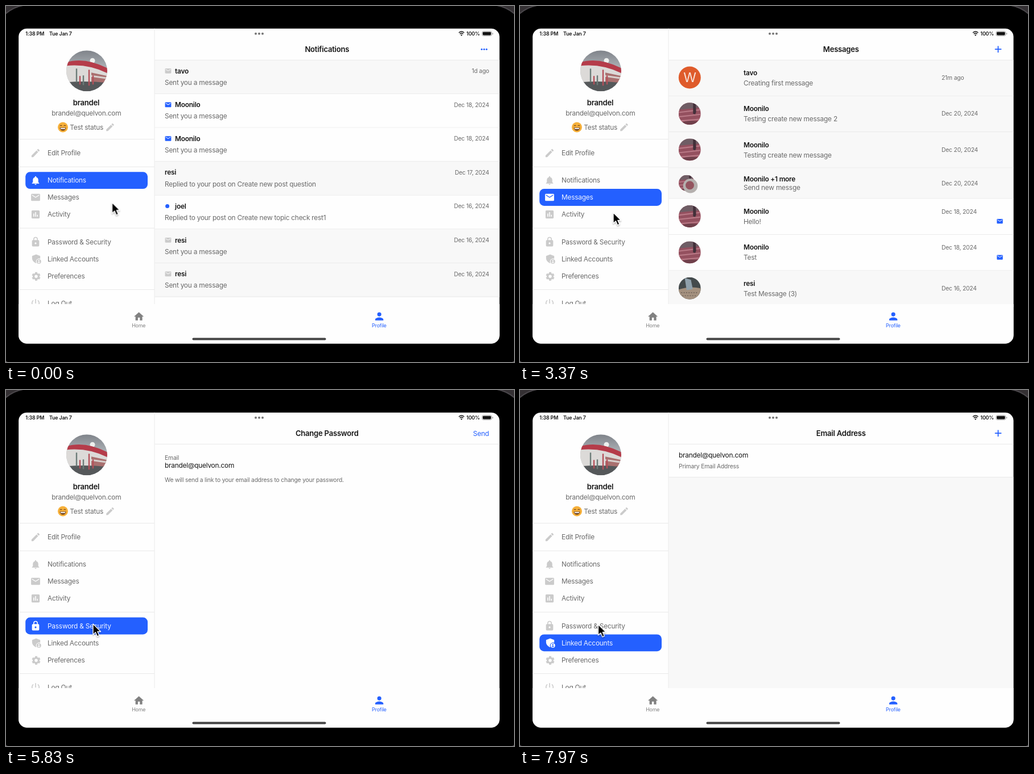
An HTML page for the animation above (8000 ms loop, 893 by 627 pixels).

```html
<!DOCTYPE html>
<html lang="en">
<head>
<meta charset="utf-8">
<title>Tablet profile</title>
<style>
  html, body { margin: 0; width: 100%; height: 100%; overflow: hidden; background: #000; }
  svg { display: block; width: 893px; height: 627px; }
  text { font-family: Inter, Roboto, sans-serif; letter-spacing: -.019em; white-space: pre; }
  .bold { font-weight: 600; }
  .mid { text-anchor: middle; }
  .end { text-anchor: end; }
  .screen { visibility: hidden; }
  #spinner { transform-origin: 564px 302.5px; animation: spin 1s steps(8) infinite; }
  #cursor { animation: move 8s infinite ease-in-out; }
  @keyframes spin { to { transform: rotate(360deg); } }
</style>
</head>
<body>
<svg id="stage" viewBox="0 0 893 627" xmlns="http://www.w3.org/2000/svg"></svg>
<script>
const LOOP = 8000;
const BLUE = '#2460ff', INK = '#161616', GRAY = '#6a6a6a', ICON = '#cbcbcb', LINE = '#e9e9e9', PALE = '#f8f8f8', PAGE = '#fefefe';
const USER = 'brandel', EMAIL = 'brandel@quelvon.com';
const SIZES = { title: 13.1, body: 11.88, small: 10.35, tiny: 8.9 };

const PATHS = {
  edit: 'M3 17.25V21h3.75L17.81 9.94l-3.75-3.75zM20.71 7.04a1 1 0 0 0 0-1.41l-2.34-2.34a1 1 0 0 0-1.41 0l-1.83 1.83 3.75 3.75z',
  bell: 'M12 22a2 2 0 0 0 2-2h-4a2 2 0 0 0 2 2zm6-6v-5c0-3.07-1.63-5.64-4.5-6.32V4a1.5 1.5 0 0 0-3 0v.68C7.64 5.36 6 7.92 6 11v5l-2 2v1h16v-1z',
  mail: 'M20 4H4a2 2 0 0 0-2 2v12a2 2 0 0 0 2 2h16a2 2 0 0 0 2-2V6a2 2 0 0 0-2-2zm0 4l-8 5-8-5V6l8 5 8-5z',
  chart: 'M19 3H5a2 2 0 0 0-2 2v14a2 2 0 0 0 2 2h14a2 2 0 0 0 2-2V5a2 2 0 0 0-2-2zM9 17H7v-7h2zm4 0h-2V7h2zm4 0h-2v-4h2z',
  lock: 'M18 8h-1V6A5 5 0 0 0 7 6v2H6a2 2 0 0 0-2 2v10a2 2 0 0 0 2 2h12a2 2 0 0 0 2-2V10a2 2 0 0 0-2-2zm-6 9a2 2 0 1 1 0-4 2 2 0 0 1 0 4zm3.1-9H8.9V6a3.1 3.1 0 0 1 6.2 0z',
  shield: 'M12 2l9 3.5v6.2a7 7 0 0 0-8.6 9.8l-.4.2c-5-1.6-9-6-9-11V5.5zM18 13a5 5 0 1 0 0 10 5 5 0 0 0 0-10zm0 1.7a1.6 1.6 0 1 1 0 3.2 1.6 1.6 0 0 1 0-3.2zm0 6.8a3.6 3.6 0 0 1-2.7-1.5c.6-1.4 4.8-1.4 5.4 0a3.6 3.6 0 0 1-2.7 1.5z',
  power: 'M13 3h-2v10h2zM17.8 5.2l-1.4 1.4a7 7 0 1 1-8.8 0L6.2 5.2a9 9 0 1 0 11.6 0z',
  home: 'M10 20v-6h4v6h5v-8h3L12 3 2 12h3v8z',
  person: 'M12 12a4 4 0 1 0 0-8 4 4 0 0 0 0 8zm0 2c-2.67 0-8 1.34-8 4v2h16v-2c0-2.66-5.33-4-8-4z'
};

// y is the visual middle of the line
const text = (x, y, str, size = 'body', fill = GRAY, cls = '') =>
  `<text x="${x}" y="${y + SIZES[size] * .36}" font-size="${SIZES[size]}" fill="${fill}" class="${cls}">${str}</text>`;
const rect = (x, y, w, h, fill, rx = 0, extra = '') =>
  `<rect x="${x}" y="${y}" width="${w}" height="${h}" rx="${rx}" fill="${fill}" ${extra}/>`;
const circle = (x, y, r, fill, extra = '') => `<circle cx="${x}" cy="${y}" r="${r}" fill="${fill}" ${extra}/>`;
const hline = (x, y, w) => rect(x, y - .5, w, 1, LINE);
const picture = (id, x, y, r) => `<use href="#${id}" transform="translate(${x} ${y}) scale(${r / 36})"/>`;

function icon(name, x, y, size, fill = ICON) {
  const at = `transform="translate(${x} ${y}) scale(${size / 24})"`;
  if (name !== 'gear') return `<g ${at}><path transform="translate(-12 -12)" fill="${fill}" d="${PATHS[name]}"/></g>`;
  const teeth = [0, 60, 120].map(a =>
    `<path d="M0-9.5V-6M0 6V9.5" stroke-width="5" transform="rotate(${a})"/>`).join('');
  return `<g ${at} fill="none" stroke="${fill}"><circle r="5.5" stroke-width="4.2"/>${teeth}</g>`;
}

const MENU = [
  ['edit', 'Edit Profile', 259], ['bell', 'Notifications', 307.2], ['mail', 'Messages', 337],
  ['chart', 'Activity', 367], ['lock', 'Password &amp; Security', 415.5],
  ['shield', 'Linked Accounts', 445.3], ['gear', 'Preferences', 475.3], ['power', 'Log Out', 523.3]
];
const menuItem = ([name, label, y], textFill = GRAY, iconFill = ICON) =>
  icon(name, name === 'gear' || name === 'shield' ? 53 : 52, name === 'gear' ? y + 1 : y, 19, iconFill) +
  text(73, y, label, 'body', textFill);
const activeItem = i => rect(34.2, MENU[i][2] - 14.9, 214.8, 29.8, BLUE, 8) + menuItem(MENU[i], '#eef2ff', '#fff');

const header = title => text(564.3, 76.3, title, 'title', INK, 'bold mid');
const plus = `<path d="M840.5 70.5v11.5M834.8 76.2h11.5" stroke="${BLUE}" stroke-width="1.8"/>`;

function notifications() {
  const sent = 'Sent you a message', reply = 'Replied to your post on Create new ';
  const rows = [
    ['tavo', sent, '1d ago', 'read'], ['Moonilo', sent, 'Dec 18, 2024', 'new'],
    ['Moonilo', sent, 'Dec 18, 2024', 'new'], ['resi', reply + 'post question', 'Dec 17, 2024', 'plain'],
    ['joel', reply + 'topic check rest1', 'Dec 16, 2024', 'dot'],
    ['resi', sent, 'Dec 16, 2024', 'read'], ['resi', sent, 'Dec 16, 2024', 'read']
  ];
  const dots = [836.2, 840.5, 844.8].map(x => circle(x, 76.2, 1.5, BLUE)).join('');
  return header('Notifications') + dots + rows.map(([name, body, date, kind], i) => {
    const top = 95.3 + 59.6 * i, y = top + 19;
    const unread = kind === 'new' || kind === 'dot';
    const mark = kind === 'dot' ? circle(283.6, y - .3, 3.5, BLUE)
      : kind === 'plain' ? '' : icon('mail', 285, y, 13, unread ? BLUE : ICON);
    return rect(261.5, top, 606, 59.6, unread ? PAGE : PALE) + hline(261.5, top + 59.2, 606) + mark +
      text(kind === 'plain' ? 279 : 297, y, name, 'body', INK, 'bold') +
      text(279, y + 20.2, body) + text(849.3, y, date, 'small', GRAY, 'end');
  }).join('');
}

function loading() {
  const spokes = Array.from({ length: 8 }, (_, i) =>
    `<path d="M564 306V309.5" stroke="${BLUE}" stroke-width="1.9" stroke-linecap="round"
      opacity="${1 - i * .11}" transform="rotate(${-45 * i} 564 302.5)"/>`).join('');
  return header('Messages') + plus + `<g id="spinner">${spokes}</g>` + text(563.8, 317.5, 'Loading...', 'body', INK, 'mid');
}

function messages() {
  const rows = [
    ['tavo', 'Creating first message', '21m ago', 'letter'],
    ['Moonilo', 'Testing create new message 2', 'Dec 20, 2024', 'field'],
    ['Moonilo', 'Testing create new message', 'Dec 20, 2024', 'field'],
    ['Moonilo +1 more', 'Send new messge', 'Dec 20, 2024', 'pair'],
    ['Moonilo', 'Hello!', 'Dec 18, 2024', 'field', true],
    ['Moonilo', 'Test', 'Dec 18, 2024', 'field', true],
    ['resi', 'Test Message (3)', 'Dec 16, 2024', 'seeds']
  ];
  let top = 95.3;
  return header('Messages') + plus + rows.map(([name, body, date, face, unread]) => {
    const pair = face === 'pair', h = pair ? 54 : 63.4, mid = top + (pair ? 27.3 : 31);
    const avatar = face === 'letter'
      ? circle(298.3, mid - .3, 19.5, '#df5b2b') +
        `<text x="298.3" y="${mid + 7.9}" font-size="23" fill="#f8e3da" class="mid">W</text>`
      : pair ? picture('field', 293, mid - 1, 14) + circle(299.5, mid + 4, 12.8, '#b5b0ae') + circle(298.5, mid + 3, 7.5, '#94545f')
      : picture(face, 298.3, mid, 19.5);
    const out = rect(261.5, top, 606, h, unread ? PAGE : PALE) + hline(261.5, top + h - .4, 606) + avatar +
      text(393, mid - (pair ? 7.7 : 8.7), name, 'body', INK, 'bold') +
      text(393, mid + (pair ? 7 : 9.2), body) +
      text(741, mid - (unread ? 8.7 : pair ? .5 : 0), date, 'small') +
      (unread ? icon('mail', 843.5, mid + 8.7, 12.5, BLUE) : '');
    top += h;
    return out;
  }).join('');
}

function activity() {
  const posts = [
    ['Creating new post landscape', 'a few seconds ago', 'hello my new post'],
    ['Creating new post tablet', '22m ago', 'hello my first post'],
    ['Post image', 'Dec 23, 2024', '']
  ];
  return header('Activity') + rect(261.5, 95.5, 606, 430, PALE) + posts.map(([title, when, body], i) => {
    const y = 104 + 169.2 * i;
    return rect(305.7, y, 517, 160, '#fff', 4, 'filter="url(#soft)"') +
      text(324, y + 26.3, title, 'title', INK, 'bold') + picture('venue', 338.7, y + 60.7, 15) +
      text(359.5, y + 53.7, 'Brandel', 'body', INK) + text(359.5, y + 69, when, 'small') +
      rect(324, y + 88, 82, 21.5, '#fff', 1, `stroke="${LINE}"`) + circle(333.5, y + 98.7, 2.4, '#222') +
      text(339.3, y + 98.7, 'Verbora UAT', 'small') + text(324, y + 129.5, body, 'body', INK);
  }).join('');
}

const password = () => header('Change Password') + text(849, 76.3, 'Send', 'body', BLUE, 'end') +
  text(279, 119.3, 'Email', 'small') + text(279, 133, EMAIL, 'body', INK) +
  text(279, 158.5, 'We will send a link to your email address to change your password.', 'small');

const linked = () => header('Email Address') + plus + rect(261.5, 153.5, 606, 372, PALE) + hline(261.5, 153.5, 606) +
  text(279, 114.7, EMAIL, 'body', INK) + text(279, 134.2, 'Primary Email Address', 'small');

// start time, active menu entry, content
const SCREENS = [
  [0, 1, notifications()], [1300, 2, loading()], [2650, 2, messages()],
  [3800, 3, activity()], [5500, 4, password()], [7600, 5, linked()]
];

// time, x, y of the pointer tip
const POINTER = [
  [0, 186.5, 346.3], [250, 186.5, 346.3], [730, 185, 331], [1200, 174, 334], [2030, 171.5, 333.5], [2650, 171.5, 333.5],
  [3370, 164, 364], [4500, 163, 365], [5170, 156, 401], [5450, 153, 412], [5900, 153, 412],
  [6630, 155.5, 340], [7450, 146, 446], [7650, 145, 446], [7970, 137.5, 413], [8000, 137.5, 413]
];

const sidebar = () => picture('venue', 142, 114.3, 36) +
  text(141, 170.3, USER, 'title', INK, 'bold mid') + text(141.3, 188.5, EMAIL, 'body', GRAY, 'mid') +
  circle(100, 213.5, 9, '#f6b03a') +
  `<path d="M94.5 214h11a5.5 5.5 0 0 1-11 0z" fill="#6b3d18"/><path d="M95.5 214.8h9l-.8 1.9h-7.4z" fill="#fff"/>
   <path d="M95 211.5q1.7-3 3.4 0m3.2 0q1.7-3 3.4 0" fill="none" stroke="#6b3d18" stroke-width="1.2"/>` +
  text(112.3, 213.5, 'Test status') + icon('edit', 183, 213.5, 18) +
  [234.7, 283.2, 391.2, 499.5].map(y => hline(22, y, 239)).join('') +
  MENU.map(item => menuItem(item)).join('') + rect(260.5, 39, 1, 487, LINE) + hline(261.5, 95.3, 606);

const statusBar = () => text(34.3, 48.5, '1:38 PM', 'tiny', INK, 'bold') + text(76, 48.5, 'Tue Jan 7', 'tiny', INK, 'bold') +
  [439, 445, 451].map(x => circle(x, 48.7, 2, '#777')).join('') +
  `<path d="M796 47q4.7-3.9 9.4 0M797.7 49.2q3-2.3 6 0" fill="none" stroke="#111" stroke-width="1.5"/>
   <path d="M799 50.9q1.7-1.2 3.4 0l-1.7 1.9z" fill="#111"/>` +
  text(833, 48.5, '100%', 'tiny', INK, 'bold end') +
  rect(836.8, 44.6, 17, 8, 'none', 2.4, 'stroke="#999" stroke-width=".8"') + rect(838, 45.8, 14.6, 5.6, '#111', 1.4) +
  rect(855, 47.2, 1.2, 3, '#999', .6);

const tabBar = () => rect(22, 525, 846, 70, PAGE) +
  icon('home', 233.6, 547, 20.5, '#818181') + text(233.3, 562.7, 'Home', 'tiny', '#818181', 'mid') +
  icon('person', 656.2, 546.7, 21.5, BLUE) + text(656, 562.7, 'Profile', 'tiny', BLUE, 'mid') +
  rect(327.5, 584.5, 235, 4, '#444', 2);

const DEFS = `<defs>
  <clipPath id="glass"><rect x="22.2" y="39.7" width="845.3" height="554.8" rx="14.5"/></clipPath>
  <clipPath id="round"><circle r="36"/></clipPath>
  <filter id="soft" x="-5%" y="-5%" width="110%" height="115%">
    <feDropShadow dx="0" dy="1" stdDeviation="1.5" flood-opacity=".13"/></filter>
  <filter id="drop" x="-40%" y="-40%" width="200%" height="200%">
    <feDropShadow dx="0" dy="1.5" stdDeviation="1.2" flood-opacity=".35"/></filter>
  <linearGradient id="sky" x2="0" y2="1"><stop stop-color="#7f838a"/><stop offset=".5" stop-color="#b4b9bd"/></linearGradient>
  <g id="venue" clip-path="url(#round)">
    <path d="M-36-36h72v72h-72z" fill="url(#sky)"/>
    <circle cx="10" cy="-18" r="4.5" fill="#eef0ee"/>
    <path d="M-36-11L-6-14 36 2v20h-72z" fill="#dcdad8"/>
    <path d="M-36-15Q-4-25 36-5V4Q2-13-36-9z" fill="#b53c4a"/>
    <path d="M8 3l28 6v13H8z" fill="#a9706f"/>
    <path d="M8 9l28 4" stroke="#d8d0cd" stroke-width="3"/>
    <path d="M-36 20Q0 17 36 21v15h-72z" fill="#55585a"/>
    <path d="M-12 9v15M4-2v28M11 8v16" stroke="#b5505a" stroke-width="2.4"/>
    <path d="M-18-4v24M-6 8v17" stroke="#6c7c78" stroke-width="2.4"/>
  </g>
  <g id="field" clip-path="url(#round)">
    <path d="M-36-36h72v72h-72z" fill="#94505f"/>
    <path d="M-36-36h72v16l-72 7z" fill="#6f5d65"/>
    <path d="M-36-4L36-13M-36 10L36 2M-36 24L36 18" stroke="#b97986" stroke-width="4"/>
    <path d="M11-36h8l2 30-3 8-7-2z" fill="#43303a"/>
    <path d="M-36 31Q0 18 36 27v9h-72z" fill="#70404b"/>
  </g>
  <g id="seeds" clip-path="url(#round)">
    <path d="M-36-36h72v72h-72z" fill="#434a4c"/>
    <path d="M-36 4Q0-8 36 0v36h-72z" fill="#a4917f"/>
    <path d="M-16-34L4-28 10 2-10 6z" fill="#8fa0ab"/>
    <path d="M-28 14h56M-24 24h48" stroke="#76685d" stroke-width="3" stroke-dasharray="4 4"/>
  </g>
</defs>`;

document.getElementById('stage').innerHTML = DEFS +
  rect(0, 0, 893, 627, '#343033') + rect(-24, -2, 941, 643, '#000', 66, 'stroke="#4a474b" stroke-width="2"') +
  `<g clip-path="url(#glass)">${rect(22, 39, 846, 556, PAGE)}` +
  SCREENS.map(([, , body], i) => `<g class="screen" style="animation:show${i} 8s step-end infinite">${body}</g>`).join('') +
  sidebar() +
  SCREENS.map(([, item], i) => `<g class="screen" style="animation:show${i} 8s step-end infinite">${activeItem(item)}</g>`).join('') +
  statusBar() + tabBar() + '</g>' +
  `<g id="cursor"><path d="M0 0V18.8L4.4 14.7 7.4 21.8 10.8 20.3 7.8 13.5H13.5z" fill="#000"
    stroke="#fff" stroke-width="1.3" stroke-linejoin="round" filter="url(#drop)"/></g>`;

const percent = ms => ms / LOOP * 100 + '%';
const rules = SCREENS.map(([start], i) => {
  const end = SCREENS[i + 1]?.[0] ?? LOOP;
  return `@keyframes show${i}{0%{visibility:hidden}${percent(start)}{visibility:visible}` +
    `${percent(end)}{visibility:${end === LOOP ? 'visible' : 'hidden'}}}`;
});
rules.push(`@keyframes move{${POINTER.map(([ms, x, y]) =>
  `${percent(ms)}{transform:translate(${x}px,${y}px)}`).join('')}}`);
document.head.appendChild(document.createElement('style')).textContent = rules.join('\n');
</script>
</body>
</html>
```
